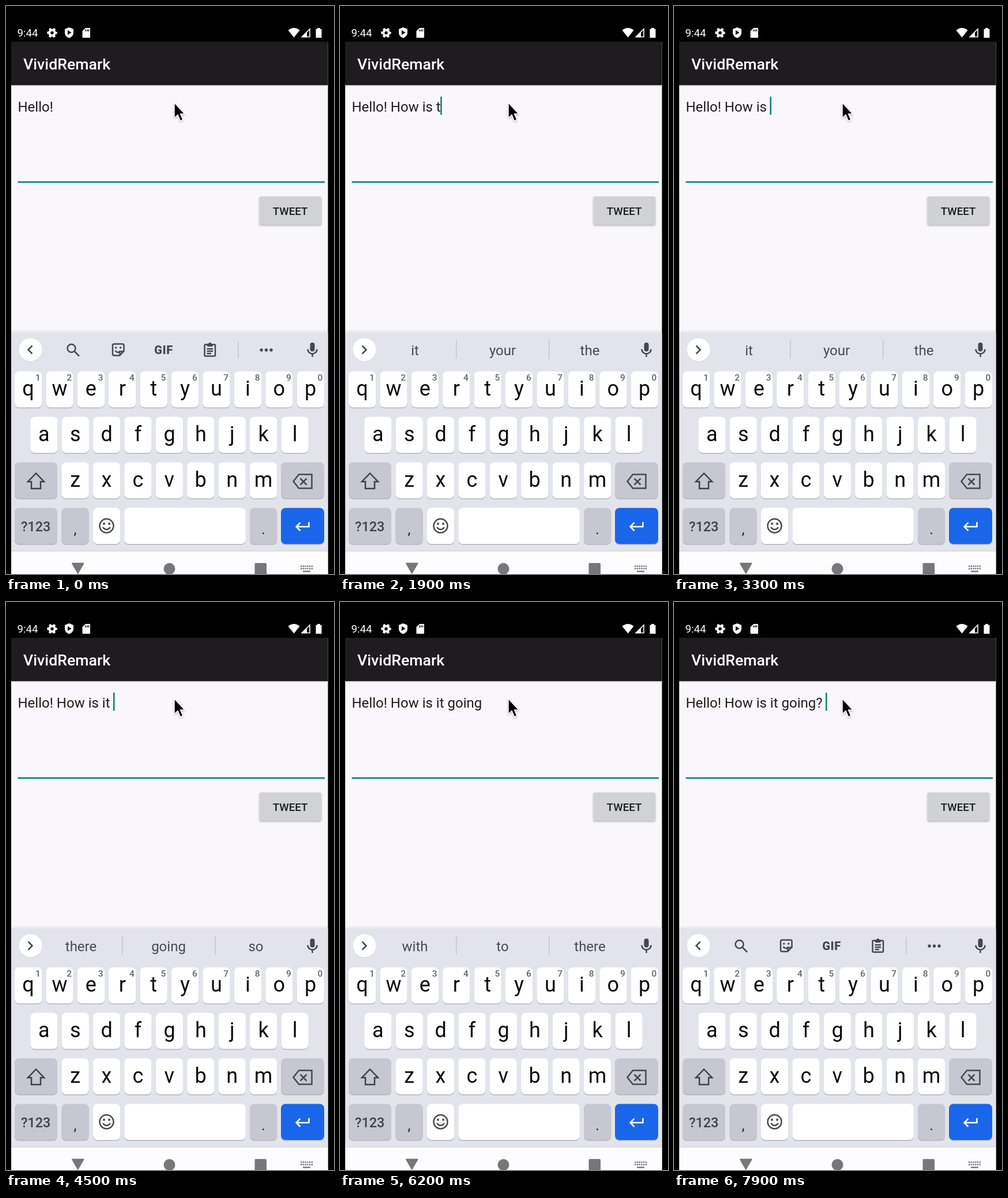
Recreate the animation shown at these times as an HTML page. Size 569x984 px, loop 8000 ms.

```html
<!DOCTYPE html>
<html lang="en">
<head>
<meta charset="utf-8">
<title>Compose message</title>
<style>
html, body { margin: 0; width: 100%; height: 100%; overflow: hidden; background: #000; }
svg { display: block; width: 100vw; height: 100vh; font-family: Roboto, "Liberation Sans", sans-serif; }
text { white-space: pre; }
.mid { text-anchor: middle; }
.medium { font-weight: 500; }
.letter { font-size: 36px; fill: #0b0b0c; }
.hint { font-size: 15.5px; font-weight: 500; fill: #626469; }
.word { font-size: 24px; fill: #484a4f; }
.line { fill: none; stroke: #46484d; stroke-width: 2.5; }
.solid { fill: #46484d; }
.rule { fill: #c3c4ca; }
</style>
</head>
<body>
<svg viewBox="0 0 569 984" preserveAspectRatio="none">
  <defs>
    <filter id="soft" x="-30%" y="-30%" width="160%" height="170%">
      <feDropShadow dx="0" dy="1.5" stdDeviation="1.5" flood-opacity=".3"/>
    </filter>
    <linearGradient id="fade" x2="0" y2="1">
      <stop stop-color="#000" stop-opacity="0"/>
      <stop offset="1" stop-color="#000" stop-opacity=".07"/>
    </linearGradient>
  </defs>

  <rect width="569" height="984"/>
  <rect x="9" y="62" width="549.5" height="922" fill="#f9f7fb"/>
  <rect x="9" y="62" width="549.5" height="75.5" fill="#1f1c20"/>
  <rect x="9" y="137.5" width="549.5" height="2" fill="#ebe9ed"/>

  <!-- status bar -->
  <g fill="#fff">
    <text x="19.5" y="53" font-size="18.7">9:44</text>
    <circle cx="80" cy="46.500" r="4.700" fill="none" stroke="#fff" stroke-width="4"/>
    <circle cx="80" cy="46.500" r="7.200" fill="none" stroke="#fff" stroke-width="3" stroke-dasharray="4 3.54" stroke-dashoffset="2"/>
    <path d="M109.500 37L117 40V46C117 50.500 114 54 109.500 55.500C105 54 102 50.500 102 46V40Z"/>
    <path d="M107 42L113.500 46L107 50Z" fill="#000"/>
    <path d="M138 38H145Q146 38 146 39V54Q146 55 145 55H133.500Q132.500 55 132.500 54V43.500Z"/>
    <path d="M138 40.500V44M140.800 40.500V44M143.500 40.500V44" stroke="#000" stroke-width="1.400"/>
    <path d="M489.500 42Q499.500 34 509.500 42L499.500 54.500Z"/>
    <path d="M513.500 53.500H527V40Z" fill="none" stroke="#fff" stroke-width="1.600"/>
    <path d="M512 54.300L522 44.500V54.300Z"/>
    <path d="M540 38H545V40H547.500V55H537.500V40H540Z"/>
  </g>

  <text class="medium" x="30" y="110" font-size="26.7" fill="#fff">VividRemark</text>

  <!-- message field -->
  <text id="message" x="20.5" y="182.5" font-size="24" fill="#1d1c1f"></text>
  <rect id="caret" y="157" width="2.6" height="31.500" fill="#0d857a"/>
  <rect x="20.500" y="303.600" width="532.500" height="2.800" fill="#0d857a"/>
  <rect x="439.500" y="330" width="107.500" height="49" rx="2.500" fill="#d0d2d3" filter="url(#soft)"/>
  <text class="mid medium" x="493" y="361.500" font-size="18.7" fill="#1b1b1d">TWEET</text>

  <!-- keyboard -->
  <rect x="9" y="560" width="549.500" height="6" fill="url(#fade)"/>
  <rect x="9" y="566" width="549.500" height="378" fill="#e3e4eb"/>
  <rect x="9" y="944" width="549.500" height="40" fill="#fdfcff"/>
  <rect x="9" y="943.500" width="549.500" height="1.500" fill="#d9dae0"/>
  <circle cx="42.500" cy="596.300" r="20" fill="#c9cad0"/>
  <circle cx="42.500" cy="595.500" r="20" fill="#fff"/>
  <path id="chevron" class="line"/>

  <g id="toolbar">
    <circle class="line" cx="113.500" cy="593" r="7"/>
    <path class="line" d="M118.500 598L127 606.500" stroke-width="3"/>
    <path class="line" d="M187.500 585.500H202Q204.500 585.500 204.500 588V598L197 605.500H187.500Q185 605.500 185 603V588Q185 585.500 187.500 585.500Z"/>
    <path class="line" d="M189.500 597Q193.500 602.500 198 598M197.500 605V598.500H204" stroke-width="2"/>
    <circle class="solid" cx="190.700" cy="592" r="1.700"/>
    <circle class="solid" cx="198.700" cy="592" r="1.700"/>
    <text class="mid solid" x="273.500" y="602.500" font-size="20" font-weight="900" letter-spacing=".7">GIF</text>
    <rect class="line" x="344.500" y="586.500" width="18.500" height="20" rx="1.500"/>
    <path class="solid" d="M349 585H351Q353.700 580.500 356.500 585H358.500V590H349Z"/>
    <path class="line" d="M348.500 594H359M348.500 598H359M348.500 602H356" stroke-width="2"/>
    <rect class="rule" x="402" y="581" width="1.500" height="29"/>
    <g class="solid"><circle cx="443" cy="596" r="2.700"/><circle cx="451.500" cy="596" r="2.700"/><circle cx="460" cy="596" r="2.700"/></g>
  </g>
  <g id="strip">
    <rect class="rule" x="201" y="579" width="1.500" height="32"/>
    <rect class="rule" x="362" y="579" width="1.500" height="32"/>
    <text class="word mid" x="130" y="605"></text>
    <text class="word mid" x="282" y="605"></text>
    <text class="word mid" x="433.500" y="605"></text>
  </g>
  <rect class="solid" x="527.500" y="583" width="8" height="15.500" rx="4"/>
  <path class="line" d="M523.500 594.500C523.500 605 539.500 605 539.500 594.500M531.500 602V608"/>

  <g id="keys"></g>

  <!-- key symbols -->
  <path id="shift" d="M52 809.500L66 824H60V836H44V824H38Z" fill="none" stroke="#3f4146" stroke-width="2.500"/>
  <path class="line" d="M508 811.500H530.500V835.500H508L498.500 823.500ZM510.500 818.500L521.500 829.500M521.500 818.500L510.500 829.500"/>
  <text class="mid medium" x="51.700" y="909.500" font-size="23.5" fill="#404247">?123</text>
  <text class="mid" x="120" y="915" font-size="25" fill="#26272b">,</text>
  <text class="mid" x="446.500" y="915" font-size="25" fill="#26272b">.</text>
  <circle class="line" cx="174.500" cy="900.500" r="12"/>
  <circle class="solid" cx="170" cy="897" r="2"/>
  <circle class="solid" cx="179" cy="897" r="2"/>
  <path class="line" d="M168 903Q174.500 911 181 903" stroke-width="2.200"/>
  <path d="M525.500 894V902H504M510.500 895L503.500 902L510.500 909" fill="none" stroke="#fff" stroke-width="2.500"/>

  <!-- navigation bar -->
  <g fill="#77767b">
    <path d="M115 965.500H134.500L124.700 982.500Z" stroke="#77767b" stroke-width="2" stroke-linejoin="round"/>
    <circle cx="283.500" cy="975" r="10"/>
    <rect x="431.500" y="965" width="20.500" height="20" rx="1.500"/>
    <path d="M511 970.500H532M511 974.700H532" fill="none" stroke="#77767b" stroke-width="2.400" stroke-dasharray="2.400 1.320"/>
    <path d="M515 979.500H528" stroke="#77767b" stroke-width="2.400"/>
  </g>

  <!-- pointer -->
  <path d="M292 167.500V194L298 188.500L302.300 198.800L306.800 197L302.500 187H310Z" stroke="#fff" stroke-width="1.400" filter="url(#soft)"/>
</svg>

<script>
const LOOP = 8000, BLINK = 500;

// [time, text in the field]
const typed = [
  [-600, "Hello!"], [400, "Hello! "], [800, "Hello! H"], [1000, "Hello! Ho"],
  [1200, "Hello! How"], [1300, "Hello! How "], [1400, "Hello! How i"],
  [1600, "Hello! How is"], [1700, "Hello! How is "], [1900, "Hello! How is t"],
  [3100, "Hello! How is "], [3600, "Hello! How is i"], [3800, "Hello! How is it"],
  [4300, "Hello! How is it "], [4800, "Hello! How is it g"], [5000, "Hello! How is it go"],
  [5100, "Hello! How is it goi"], [5300, "Hello! How is it goin"], [5400, "Hello! How is it going"],
  [5600, "Hello! How is it going "], [7000, "Hello! How is it going"],
  [7300, "Hello! How is it going?"], [7800, "Hello! How is it going? "]
];

// [time, suggested words]; no words brings the toolbar back
const offers = [
  [0, ""], [1000, "He H Hi"], [1100, "Hi How Hope"], [1400, "are is do"],
  [1500, "in is it"], [1800, "it your the"], [2000, "to the this"], [3200, "it your the"],
  [3700, "in is it"], [3900, "its it it's"], [4400, "there going so"],
  [4900, "good going get"], [5700, "with to there"], [7100, "gong going goings"], [7400, ""]
];

const $ = id => document.getElementById(id);
const at = (list, t) => list.findLast(e => e[0] <= t);
const pen = document.createElement("canvas").getContext("2d");
pen.font = '24px Roboto, "Liberation Sans", sans-serif';

function add(tag, attrs, text = "") {
  const el = document.createElementNS("http://www.w3.org/2000/svg", tag);
  for (const k in attrs) el.setAttribute(k, attrs[k]);
  el.textContent = text;
  return $("keys").appendChild(el);
}

function key(x, y, w, fill = "#fff") {
  add("rect", { x, y: y + 1.5, width: w, height: 62.5, rx: 7.5, fill: "#b3b5bc" });
  add("rect", { x, y, width: w, height: 62.5, rx: 7.5, fill });
}

const GREY = "#c6c7d0", PITCH = 54.4, WIDTH = 47.2;
const letters = [];
[["qwertyuiop", 15, 633], ["asdfghjkl", 42.3, 711.7], ["zxcvbnm", 96.5, 790.5]].forEach(([row, left, y], r) => {
  [...row].forEach((c, i) => {
    const x = left + i * PITCH;
    key(x, y, WIDTH);
    letters.push(add("text", { class: "letter mid", x: x + WIDTH / 2, y: y + 42 }, c));
    if (!r) add("text", { class: "hint mid", x: x + 40.3, y: 649 }, (i + 1) % 10);
  });
});
key(15, 790.5, 74, GREY);
key(477, 790.5, 75, GREY);
[[15, 74, GREY], [96.5, WIDTH, GREY], [151, WIDTH], [205.3, 210.5], [423, WIDTH, GREY], [477, 75, "#1a66ea"]]
  .forEach(([x, w, fill]) => key(x, 869.5, w, fill));

const words = $("strip").querySelectorAll("text");

function draw(t) {
  const [since, text] = at(typed, t);
  const caps = /[!?] $/.test(at(typed, t - 100)[1]) && t < 7900;
  const offer = at(offers, t)[1];

  $("message").textContent = text;
  $("caret").setAttribute("x", 20 + pen.measureText(text).width);
  $("caret").style.display = (t - since) % (2 * BLINK) < BLINK ? "" : "none";

  $("toolbar").style.display = offer ? "none" : "";
  $("strip").style.display = offer ? "" : "none";
  $("chevron").setAttribute("d", offer ? "M38.5 588.500L45.500 595.500L38.500 602.500" : "M45.500 588.500L38.500 595.500L45.500 602.500");
  offer.split(" ").forEach((w, i) => words[i].textContent = w);

  $("shift").setAttribute("fill", caps ? "#3f4146" : "none");
  for (const el of letters) {
    const c = el.textContent;
    el.textContent = caps ? c.toUpperCase() : c.toLowerCase();
  }
}

const start = performance.now();
function tick() {
  draw((performance.now() - start) % LOOP);
  requestAnimationFrame(tick);
}
tick();
</script>
</body>
</html>
```
